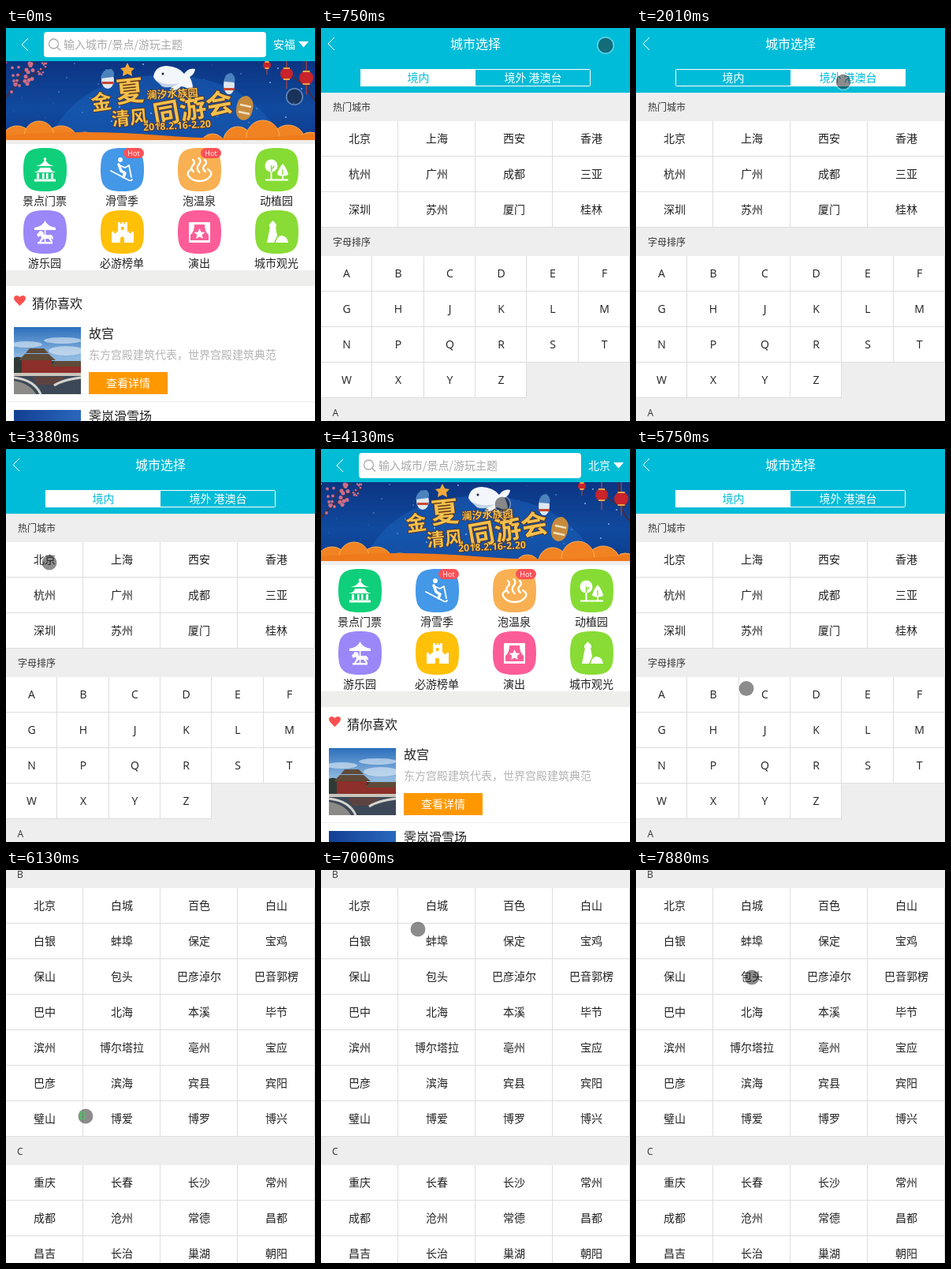
Animation, 392 px wide and 498 px high, one loop 8 s. Source, as an HTML page:

```html
<!DOCTYPE html>
<html lang="zh-CN">
<head>
<meta charset="utf-8">
<title>城市选择</title>
<style>
  html, body { margin: 0; width: 100%; height: 100%; overflow: hidden; background: #fff; }
  svg { display: block; width: 392px; height: 498px; }
  text { font: 14px "Noto Sans CJK SC", "Noto Sans CJK", "Open Sans", sans-serif; fill: #222; }
  .mid { text-anchor: middle; }
  .big { font-size: 16px; }
  .small { font-size: 12px; fill: #333; }
  .letter { font-family: "Open Sans", "Noto Sans", sans-serif; }
  .white { fill: #fff; }
  .hot { font: 9px "Open Sans", sans-serif; fill: #fff; text-anchor: middle; }
  .gold text { font-weight: 700; fill: #f3c04c; stroke: #5b2f1c; stroke-width: 1.6px; paint-order: stroke; text-anchor: middle; }
  .line { fill: none; stroke: #fff; stroke-width: 2.4; stroke-linecap: round; stroke-linejoin: round; }
  .thin { fill: none; stroke: #fff; stroke-width: 1; }
</style>
</head>
<body>
<svg viewBox="0 0 392 498">
  <defs>
    <linearGradient id="night" x2="0" y2="1">
      <stop offset="0" stop-color="#0c3482"/><stop offset=".6" stop-color="#104a9f"/><stop offset="1" stop-color="#0d3c8e"/>
    </linearGradient>
    <linearGradient id="sky" x2="0" y2="1">
      <stop offset="0" stop-color="#2c6fbd"/><stop offset=".45" stop-color="#8fb9e0"/>
    </linearGradient>
    <linearGradient id="dusk">
      <stop offset="0" stop-color="#123f92"/><stop offset="1" stop-color="#2a68bd"/>
    </linearGradient>
    <clipPath id="bannerClip"><path d="M0 42h392v100H0z"/></clipPath>
    <clipPath id="photoClip"><path d="M10 379h85v85h-85z"/></clipPath>
    <path id="tile" d="M0 27.500C0 6 6 0 27.500 0S55 6 55 27.500 49 55 27.500 55 0 49 0 27.500z"/>
  </defs>

  <g id="home">
    <path fill="#fff" d="M0 0h392v498H0z"/>
    <path fill="#00bcd4" d="M0 0h392v42H0z"/>
    <path class="thin" d="M28 13l-8 8 8 8"/>
    <rect x="48" y="5" width="282" height="32" rx="4" fill="#fff"/>
    <g fill="none" stroke="#aaa" stroke-width="1.3"><circle cx="60.500" cy="20" r="6"/><path d="M65 24.500l4 4"/></g>
    <text x="73" y="26" style="fill:#a9a9a9">输入城市/景点/游玩主题</text>
    <text id="place" class="white" x="339" y="26">安福</text>
    <path fill="#fff" d="M371 17h13l-6.500 7.500z"/>

    <path fill="#eee" d="M0 142h392v5H0z"/>
    <g clip-path="url(#bannerClip)">
      <path fill="url(#night)" d="M0 42h392v100H0z"/>
      <path fill="#1b62bb" opacity=".5" d="M60 130q40-70 140-70t140 66l-60 16H110z"/>
      <g id="sparks" fill="#7fb2ee"></g>
      <g fill="none" stroke="#4a2b3c" stroke-width="1.800">
        <path d="M0 88q14-22 52-38M14 70q2-16 24-26M392 92q-18-20-14-50M386 74q-20-6-30-22"/>
      </g>
      <g id="blossom" fill="#cf6d86"></g>
      <g id="lanterns"></g>
      <g id="clouds" fill="#f28322" stroke="#ffae55" stroke-width="1"></g>
      <path fill="#ee7a1c" d="M0 136q100-8 196 0t196-2v8H0z"/>
      <!-- sea animals -->
      <path fill="#f3f6fa" d="M187 62q2-14 17-14 15 1 22 10 6-8 14-6-1 7-7 10 5 9 4 20-8-8-15-8-6 7-14 5 1-4 4-6-19 1-25-11z"/>
      <path fill="#c3d3e6" d="M190 66q14 8 30 4-12 8-22 4z"/>
      <circle cx="199" cy="58" r="1.500" fill="#223"/>
      <path fill="#f2a93a" d="M154 44l3 6 6 1-4 4 1 6-6-3-6 3 1-6-4-4 6-1z"/>
      <g fill="#dfe8f1"><ellipse cx="129" cy="66" rx="8" ry="11"/><ellipse cx="283" cy="72" rx="7" ry="12"/></g>
      <g fill="#4c82bd"><path d="M120 64q2-13 14-12 5 5 2 10zM277 68q0-11 9-11 6 5 4 12z"/></g>
      <path fill="#c88b3e" d="M292 106q0-20 14-20 10 5 7 17-2 13-12 14-9-2-9-11z"/>
      <path fill="none" stroke="#f0e2c2" stroke-width="2.500" d="M297 97l14 3M295 106l14 3"/>
      <path fill="#c74832" d="M122 68h14v3h-14zM276 76h14v3h-14z"/>
      <g class="gold">
        <text x="121" y="103" style="font-size:26px" transform="rotate(-8 121 94)">金</text>
        <text x="157" y="93" style="font-size:36px" transform="rotate(-6 157 80)">夏</text>
        <text x="157" y="122" style="font-size:23px" transform="rotate(-5 157 114)">清风</text>
        <text x="237" y="114" style="font-size:34px" transform="rotate(-10 237 102)">同游会</text>
        <text x="211" y="88" style="font-size:13px;stroke-width:1.200px" transform="rotate(-3 211 84)">澜汐水族园</text>
        <text x="217" y="128" style="font:bold 12.500px 'Open Sans',sans-serif" transform="rotate(-3 217 124)">2018.2.16-2.20</text>
      </g>
    </g>

    <g id="menu"></g>
    <g fill="#fff">
      <g transform="translate(22 152)">
        <circle cx="27.500" cy="14" r="1.800"/>
        <path d="M16 23q9-2 11.500-9 2.500 7 11.500 9zM13 31q7-1 8-6h13q1 5 8 6zM17 32h3v7h-3zM24 32h2.500v7H24zM29 32h2.500v7H29zM35 32h3v7h-3zM14 39.500h27v3H14z"/>
      </g>
      <g transform="translate(120 152)">
        <circle cx="25" cy="15" r="3"/>
        <path class="line" style="stroke-width:3.500" d="M23 21l3 8 5 3-2 5"/>
        <path class="line" style="stroke-width:1.800" d="M24 22l7 3 5-3M13 29l23 12q3 1 4-1M36 22l3 15"/>
      </g>
      <g transform="translate(218 152)">
        <path class="line" d="M20 30q-5-4-1-8t0-7M27.500 31q-5-5-1-10t0-8M35 30q-5-4-1-8t0-7"/>
        <path class="line" d="M17 27q-7 4-3 9 5 6 13.500 6t13.500-6q4-5-3-9"/>
      </g>
      <g transform="translate(316 152)">
        <circle cx="20.500" cy="22.500" r="8"/>
        <path d="M19.500 28h2v12h-2zM35 20q6 7 7 14-7 3-14 0 1-7 7-14zM34 32h2v8h-2zM13 39.500h29v2H13z"/>
        <path fill="none" stroke="#86dc34" stroke-width="1.300" d="M20.500 30v-8M20.500 27l4-4M35 34v-7"/>
      </g>
      <g transform="translate(22 231)">
        <path d="M14 22q11-2 13.500-9 2.500 7 13.500 9v3H14zM18 40h19v2.500H18zM26.800 24h1.600v17h-1.600z"/>
        <path d="M17 31l4-5 4 1 1 4h9q3 1 3 6l-3-2 2 5h-2l-3-4h-6l-4 4h-2l3-5-1-3-3 2z"/>
      </g>
      <g transform="translate(120 231)">
        <path fill-rule="evenodd" d="M14 27h3v2h3v-2h2V15h3v2h2v-2h2v2h2v-2h3v12h2v2h3v-2h3v14H30v-5a2.500 2.500 0 0 0-5 0v5H14zM26 21v4h3.500v-4z"/>
      </g>
      <g transform="translate(218 231)">
        <path fill-rule="evenodd" d="M14 15h27v26H14zM21 18q0 9-5 13v7h23v-7q-5-4-5-13z"/>
        <path d="M27.500 23l2 4.500 5 .4-3.800 3.200 1.200 5-4.400-2.700-4.400 2.700 1.200-5-3.800-3.200 5-.4z"/>
      </g>
      <g transform="translate(316 231)">
        <path d="M18 18l4.500-5 4.500 5v3h-1l2 11-4 9H15l4-20h-1zM26 41q2-9 8-9 7 1 8 9z"/>
      </g>
    </g>
    <g id="badges"></g>

    <path fill="#eeeeec" d="M0 307h392v20H0z"/>
    <path fill="#f9504f" d="M17.500 352l-6-6q-3-4 0-6.500 3.500-1.500 6 1.500 2.500-3 6-1.500 3 2.500 0 6.500z"/>
    <text class="big" x="33" y="355">猜你喜欢</text>

    <g clip-path="url(#photoClip)">
      <path fill="url(#sky)" d="M10 379h85v85h-85z"/>
      <g fill="#e3edf7" opacity=".6"><ellipse cx="26" cy="401" rx="20" ry="4"/><ellipse cx="72" cy="396" rx="24" ry="4"/><ellipse cx="76" cy="409" rx="22" ry="6"/></g>
      <path fill="#2d3a36" d="M10 418q8-4 14 4h71v16H10z"/>
      <path fill="#8d2f2a" d="M20 420h38v18H20zM56 428h39v10H56z"/>
      <path fill="#5f4a38" d="M16 421l8-8h30l9 8zM25 412l5-6h18l6 6zM56 429l6-7h33v7z"/>
      <path fill="#c9c4bb" d="M10 437h85v4H10z"/>
      <path fill="#3c4857" d="M10 441h85v23H10z"/>
      <path fill="#5c4340" d="M34 442h40l-8 10H40z"/>
      <path fill="none" stroke="#d5d3ce" stroke-width="3" d="M10 443q26 3 34 21M95 443q-24 3-34 10"/>
      <path fill="#8b8a86" d="M10 447q20 3 28 17H10z"/>
    </g>
    <text class="big" x="105" y="393">故宫</text>
    <text x="105" y="419" style="fill:#b5b5b5">东方宫殿建筑代表，世界宫殿建筑典范</text>
    <path fill="#ff9800" d="M105 436h100v28H105z"/>
    <text class="white mid" x="155" y="455">查看详情</text>
    <path fill="#eee" d="M0 473h392v1H0z"/>
    <path fill="url(#dusk)" d="M10 484h85v14H10z"/>
    <text class="big" x="105" y="498">霁岚滑雪场</text>
  </g>

  <g id="picker">
    <path fill="#eee" d="M0 0h392v498H0z"/>
    <path fill="#00bcd8" d="M0 0h392v82H0z"/>
    <path class="thin" d="M17 12l-8 8 8 8"/>
    <text class="big white mid" x="196" y="26">城市选择</text>
    <rect class="thin" x="50.500" y="52.500" width="291" height="21" rx="1"/>
    <rect id="tab" x="50" y="52" width="146" height="22" fill="#fff"/>
    <text id="inland" class="mid" x="123.500" y="68">境内</text>
    <text id="abroad" class="mid" x="269" y="68">境外 港澳台</text>
    <text class="small" x="15" y="105">热门城市</text>
    <text class="small" x="15" y="276">字母排序</text>
    <text class="small letter" x="14.500" y="492">A</text>
    <g id="pickerGrids"></g>
  </g>

  <g id="list">
    <path fill="#eee" d="M0 0h392v498H0z"/>
    <text class="small letter" x="14" y="10">B</text>
    <text class="small letter" x="14" y="361">C</text>
    <g id="listGrids"></g>
  </g>

  <g id="cursor">
    <circle r="9.500" fill="#222" fill-opacity=".52"/>
    <circle r="10.300" fill="none" stroke="#fff" stroke-opacity=".36" stroke-width="1.600"/>
    <text id="echo" class="letter mid" x="-4" y="4" style="fill:#4fc465">B</text>
  </g>
</svg>

<script>
const $ = id => document.getElementById(id);
const draw = (id, parts) => $(id).innerHTML = parts.join('');

// Cells with a right and bottom rule, filled row by row
function grid(words, cols, top, cls = '') {
  const w = 392 / cols;
  return words.map((word, i) => {
    const x = Math.round(i % cols * w), y = top + Math.floor(i / cols) * 45;
    const right = Math.round((i % cols + 1) * w);
    return `<path fill="#ddd" d="M${x} ${y}H${right}v45H${x}z"/>` +
      `<path fill="#fff" d="M${x} ${y}H${right - 1}v44H${x}z"/>` +
      `<text class="mid ${cls}" x="${(x + right) / 2}" y="${y + 27}">${word}</text>`;
  }).join('');
}

draw('pickerGrids', [
  grid('北京 上海 西安 香港 杭州 广州 成都 三亚 深圳 苏州 厦门 桂林'.split(' '), 4, 118),
  grid([...'ABCDEFGHJKLMNPQRSTWXYZ'], 6, 289, 'letter')
]);
draw('listGrids', [
  grid(('北京 白城 百色 白山 白银 蚌埠 保定 宝鸡 保山 包头 巴彦淖尔 巴音郭楞 巴中 北海 本溪 毕节 ' +
    '滨州 博尔塔拉 亳州 宝应 巴彦 滨海 宾县 宾阳 璧山 博爱 博罗 博兴').split(' '), 4, 23),
  grid('重庆 长春 长沙 常州 成都 沧州 常德 昌都 昌吉 长治 巢湖 朝阳'.split(' '), 4, 374)
]);

const menu = [['景点门票', '#10cf7a'], ['滑雪季', '#4398e8'], ['泡温泉', '#f8b053'], ['动植园', '#86dc34'],
  ['游乐园', '#9b87f8'], ['必游榜单', '#ffc008'], ['演出', '#fc5d98'], ['城市观光', '#88dc35']];
draw('menu', menu.map(([name, color], i) => {
  const x = 22 + i % 4 * 98, y = i < 4 ? 152 : 231;
  return `<use href="#tile" x="${x}" y="${y}" fill="${color}"/>` +
    `<text class="mid" x="${x + 27}" y="${y + 72}">${name}</text>`;
}));
draw('badges', [149, 247].map(x =>
  `<rect x="${x}" y="152" width="26" height="13" rx="6.5" fill="#fb5156"/><text class="hot" x="${x + 13}" y="162">Hot</text>`));

// Banner decoration
const dots = (n, spot) => Array.from({ length: n }, (_, i) => {
  const [x, y, r] = spot(i);
  return `<circle cx="${x}" cy="${y}" r="${r}"/>`;
});
draw('sparks', dots(40, i => [i * 67 % 392, 44 + i * 37 % 80, .4 + i % 3 * .3]));
draw('blossom', dots(34, i => [i * 17 % 52, 44 + i * 29 % (48 - i * 17 % 52 * .7), 1.3 + i % 3 * .6]));
draw('lanterns', [[331, 47, 5], [356, 58, 8], [381, 63, 9]].map(([x, y, r]) =>
  `<path stroke="#d8452f" d="M${x} 42V${y + r * 2.4}"/><ellipse cx="${x}" cy="${y}" rx="${r}" ry="${r}" fill="#c9232b"/>` +
  `<path fill="#e9a748" d="M${x - r / 2} ${y - r}h${r}v2h${-r}zM${x - r / 2} ${y + r - 2}h${r}v2h${-r}z"/>`));
const puffs = [[14, 144, 20], [70, 146, 22], [42, 137, 19], [100, 150, 18], [136, 151, 16],
  [262, 150, 16], [294, 143, 18], [358, 145, 22], [326, 138, 21], [386, 148, 16]];
draw('clouds', dots(puffs.length, i => puffs[i]));

// Pointer path: [step, x, y], eight steps per second
const path = [
  [0, 366, 87], [1, 364, 70], [2, 361, 40], [3, 361, 22], [7, 361, 22],
  [10, 310, 80], [11, 230, 114], [12, 187, 105], [13, 230, 80], [14, 263, 68], [16, 263, 68],
  [20, 165, 60], [22, 133, 72], [24, 100, 110], [26, 55, 148], [27, 55, 144], [30, 55, 144],
  [33, 230, 70], [35, 364, 11], [36, 363, 29], [39, 363, 30],
  [42, 290, 140], [45, 179, 295], [47, 101, 312], [49, 101, 312],
  [52, 115, 200], [55, 111, 90], [57, 135, 60], [59, 160, 80], [61, 125, 100], [62, 143, 116], [63, 147, 136]
];
function pointer(step) {
  const i = Math.max(1, path.findIndex(p => p[0] >= step));
  const [a, ax, ay] = path[i - 1], [b, bx, by] = path[i];
  const f = (step - a) / (b - a);
  return [ax + (bx - ax) * f, ay + (by - ay) * f];
}

const show = (id, on) => $(id).setAttribute('display', on ? 'inline' : 'none');

function frame() {
  const step = Math.floor(performance.now() % 8000 / 125);
  const page = step < 6 || step >= 28 && step < 39 ? 'home' : step < 49 ? 'picker' : 'list';
  for (const id of ['home', 'picker', 'list']) show(id, id === page);
  $('place').textContent = step < 28 ? '安福' : '北京';

  const right = step >= 16 && step < 22;
  $('tab').setAttribute('x', right ? 196 : 50);
  $('inland').style.fill = right ? '#fff' : '#00bcd8';
  $('abroad').style.fill = right ? '#00bcd8' : '#fff';

  $('cursor').setAttribute('transform', `translate(${pointer(step)})`);
  show('echo', step === 49);
  requestAnimationFrame(frame);
}
frame();
</script>
</body>
</html>
```
